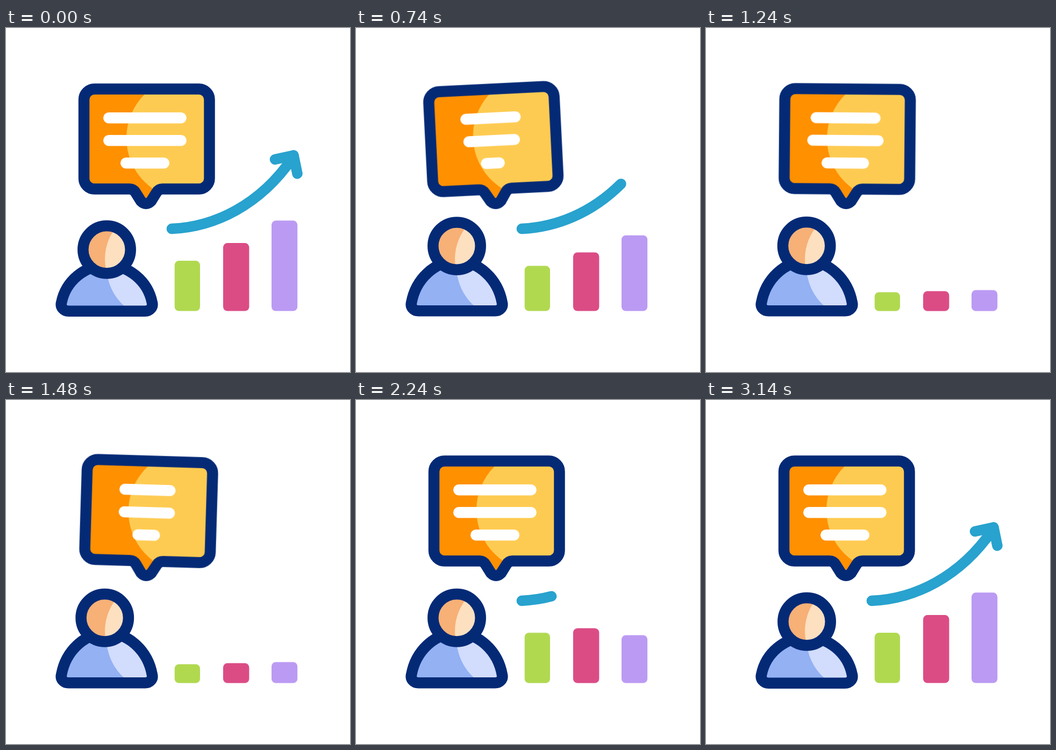
Animation, 640 px wide and 640 px high, one loop 3.36 s. Source, as an HTML page without scripts:

```html
<!DOCTYPE html>
<html lang="en">
<head>
<meta charset="utf-8">
<title>Growth talk</title>
<style>
  html, body { margin: 0; width: 100%; height: 100%; overflow: hidden; background: #fff; }
  svg { display: block; width: 100vw; height: 100vh; }
  svg * {
    animation-duration: 3360ms;
    animation-iteration-count: infinite;
    animation-timing-function: cubic-bezier(.37, 0, .63, 1);
  }
  .outline { fill: none; stroke: #042a76; stroke-width: 20.5; stroke-linejoin: round; }

  /* speech bubble */
  .bubble { transform-origin: 260.5px 330px; animation-name: tilt; }
  .lines { fill: none; stroke: #fff; stroke-width: 20.5; stroke-linecap: round; }
  .l1, .l2 { animation-name: talk; }
  .l2 { animation-delay: 64ms; }
  .l3 { animation-name: talk-short; animation-delay: 137ms; }
  @keyframes tilt {
    0%, 6.55%, 55.36%, 100% { transform: rotate(0deg); }
    14.88%, 25.6% { transform: rotate(-2.85deg); }
    43.15% { transform: rotate(1.75deg); }
  }
  @keyframes talk {
    0%, 6.55%, 30.95%, 55.36%, 100% { d: path("M191.2 0H325.6"); }
    18.75%, 43.15% { d: path("M216.7 0H300.1"); }
  }
  @keyframes talk-short {
    0%, 6.55%, 30.95%, 55.36%, 100% { d: path("M223.2 0H293.8"); }
    18.75%, 43.15% { d: path("M246.7 0H270.3"); }
  }

  /* person */
  .head { animation-name: bob, sway; }
  .body { animation-name: stretch; }
  @keyframes bob {
    0%, 6.55%, 93.45%, 100% { cy: 412.3px; }
    24.4%, 76.79% { cy: 405.3px; }
  }
  @keyframes sway {
    0%, 22.6%, 55.36%, 100% { cx: 187.5px; }
    30.7% { cx: 190.2px; }
    43.5% { cx: 183.7px; }
  }
  @keyframes stretch {
    0%, 6.55%, 93.45%, 100% {
      d: path("M116.5 526.8C107.5 526.8 101 519.5 103.1 511.1C111 470.7 146.3 441.5 187.5 441.5C228.7 441.5 264 470.7 271.9 511.1C274 519.5 267.5 526.8 258.5 526.8Z");
    }
    24.4%, 76.79% {
      d: path("M116.5 526.3C107.5 526.3 101 519.5 103.1 511.1C111 467 146.3 433.5 187.5 433.5C228.7 433.5 264 467 271.9 511.1C274 519.5 267.5 526.3 258.5 526.3Z");
    }
  }

  /* bars */
  .b1 { --full: 93.5px; --peak: 101px; --low: 35px; animation-name: bar1; }
  .b2 { --full: 126.5px; --peak: 134px; --low: 37px; animation-name: bar2; }
  .b3 { --full: 168.3px; --peak: 176px; --low: 39px; animation-name: bar3; }
  @keyframes bar1 {
    0%, 6.55%, 63.6%, 100% { height: var(--full); }
    14.88% { height: var(--peak); }
    36%, 46.43% { height: var(--low); }
  }
  @keyframes bar2 {
    0%, 6.55%, 76.93%, 100% { height: var(--full); }
    14.88% { height: var(--peak); }
    36%, 47.92% { height: var(--low); }
  }
  @keyframes bar3 {
    0%, 6.55%, 93.6%, 100% { height: var(--full); }
    14.88% { height: var(--peak); }
    36%, 46.58% { height: var(--low); }
  }

  /* arrow */
  .arrow { fill: none; stroke: #28a2ce; stroke-width: 19.5; stroke-linecap: round; stroke-linejoin: round; }
  .shaft, .tip { stroke-dasharray: 1 2; }
  .arrow { animation-name: show; animation-timing-function: step-end; }
  .shaft { animation-name: draw; }
  .tip { animation-name: draw-tip, show-tip; }
  @keyframes show {
    0%, 59.5% { visibility: visible; }
    31.5% { visibility: hidden; }
  }
  @keyframes draw {
    0%, 18.2%, 83.3%, 100% { stroke-dasharray: 1 2; }
    30.2%, 59.5% { stroke-dasharray: 0 2; }
  }
  @keyframes draw-tip {
    0%, 14.3%, 89.3%, 100% { stroke-dasharray: 1 2; }
    19%, 81.5% { stroke-dasharray: 0 2; }
  }
  @keyframes show-tip {
    0%, 18.9%, 82.5%, 100% { opacity: 1; }
    19%, 82.4% { opacity: 0; }
  }
</style>
</head>
<body>
<svg viewBox="0 0 640 640">
  <defs>
    <path id="balloon" d="M164.5 113.5H359a19.5 19.5 0 0 1 19.5 19.5V280a19.5 19.5 0 0 1-19.5 19.5H291Q284 299.5 280 306L270 322Q260.5 331.5 251 322L241 306Q237 299.5 230 299.5H164.5A19.5 19.5 0 0 1 145 280V133A19.5 19.5 0 0 1 164.5 113.5Z"/>
    <clipPath id="in-balloon"><use href="#balloon"/></clipPath>
    <clipPath id="in-head"><circle class="head" cx="187.5" cy="412.3" r="44.2"/></clipPath>
    <clipPath id="in-body"><path class="body"/></clipPath>
  </defs>

  <g class="bubble">
    <use href="#balloon" fill="#ff9000"/>
    <g clip-path="url(#in-balloon)"><circle cx="339" cy="204.8" r="115" fill="#fecb52"/></g>
    <use href="#balloon" class="outline"/>
    <g class="lines">
      <g transform="translate(0 167.3)"><path class="l1" d="M191.2 0H325.6"/></g>
      <g transform="translate(0 209.3)"><path class="l2" d="M191.2 0H325.6"/></g>
      <g transform="translate(0 251.3)"><path class="l3" d="M223.2 0H293.8"/></g>
    </g>
  </g>

  <path class="body" fill="#93b1f3"/>
  <g clip-path="url(#in-body)"><path d="M186 430V440Q188 490 222 519V540H290V430Z" fill="#d2dcfc"/></g>
  <path class="body outline"/>
  <circle class="head" cx="187.5" cy="412.3" r="44.2" fill="#f7b076"/>
  <g clip-path="url(#in-head)"><circle cx="280" cy="430" r="96" fill="#fde0c0"/></g>
  <circle class="head outline" cx="187.5" cy="412.3" r="44.2"/>

  <!-- flipped so that heights grow upwards -->
  <g transform="matrix(1 0 0 -1 0 526.6)">
    <rect class="b1" x="313.7" width="47.3" height="93.5" rx="8" fill="#b0d950"/>
    <rect class="b2" x="404" width="48.4" height="126.5" rx="8" fill="#db4c85"/>
    <rect class="b3" x="494" width="48.2" height="168.3" rx="8" fill="#bb9af3"/>
  </g>

  <g class="arrow">
    <circle cx="308.5" cy="373.5" r="9.7" fill="#28a2ce" stroke="none"/>
    <path class="shaft" pathLength="1" d="M308.5 373.5C388 370 472 330 533 242"/>
    <path class="tip" pathLength="1" d="M535 237L500.5 244.5"/>
    <path class="tip" pathLength="1" d="M535 237L542 271"/>
  </g>
</svg>
</body>
</html>
```
